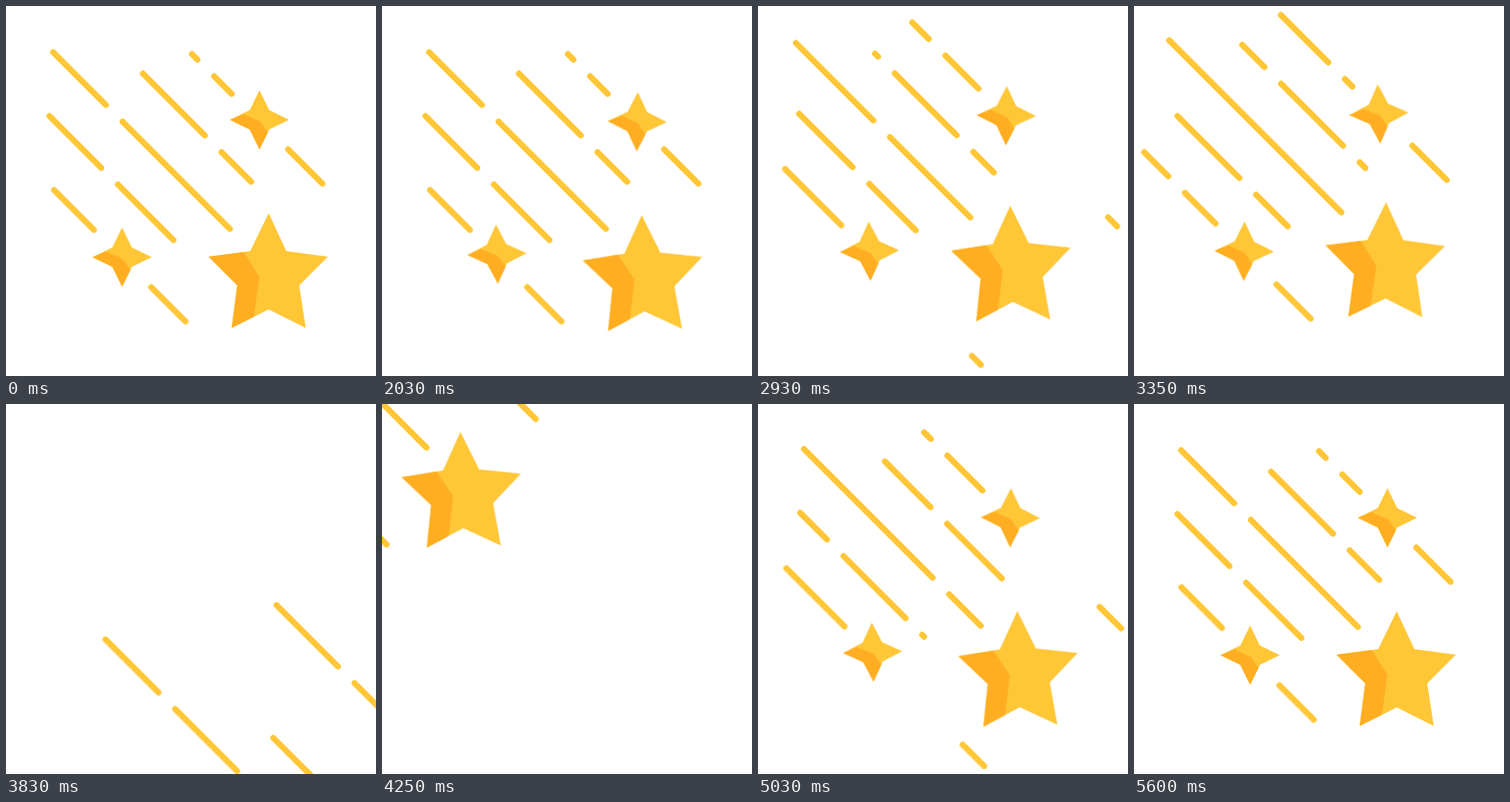
These frames come from a looping animation (400x400 px, 5630 ms). An HTML page without scripts:

```html
<!DOCTYPE html>
<html lang="en">
<head>
<meta charset="utf-8">
<title>Shooting stars</title>
<style>
html, body { margin: 0; width: 100%; height: 100%; overflow: hidden; background: #fff; }
svg { display: block; width: 100vw; height: 100vh; }

.light { fill: #ffc636; }
.dark { fill: #ffae22; }

/* Each group leans back, shoots off the lower right and returns from the upper left. */
.ride { animation: ride 5.63s linear infinite; }
.shake { transform-box: fill-box; transform-origin: center; animation: shake 5.63s linear infinite; }

/* Streaks are drawn from the head backwards; the matrix turns x into the diagonal. */
.streak {
  fill: none; stroke: #ffc636; stroke-width: 4.6; stroke-linecap: round;
  stroke-dasharray: 67 18;
  animation: 5.63s linear infinite;
}
.outer { animation-name: flow-outer, var(--length); }
.inner { animation-name: flow-inner, var(--length); }
.main { stroke-dasharray: 193 18; animation-name: flow-main, var(--length); }
.front { stroke-dasharray: 37 106; animation-name: flow-front; }

@keyframes ride {
  0%, 36.06% { translate: 0 0; }
  44.58% { translate: var(--a) var(--a); }
  59.5% { translate: var(--b) var(--b); animation-timing-function: cubic-bezier(.55, .055, .675, .19); }
  68.03% { translate: 400px 400px; }
  70.1% { translate: 650px 650px; }
  70.16% { translate: var(--from) var(--from); animation-timing-function: cubic-bezier(.25, .46, .45, .94); }
  89.88%, 100% { translate: 0 0; }
}
@keyframes shake {
  0%, 35.9%, 99.4%, 100% { transform: none; }
  36.06%, 46.8%, 53.2%, 57.4%, 63.7%, 77.7%, 84%, 90.3%, 96.6% { transform: var(--p); }
  40.3%, 44.58%, 51%, 61.6%, 81.88%, 88.2%, 94.5% { transform: var(--q); }
  38.2%, 42.4%, 49%, 55.3%, 59.5%, 79.8%, 86%, 92.4%, 98.2% { transform: var(--r); }
}

@keyframes flow-outer {
  0%, 36.06% { stroke-dashoffset: var(--o); animation-timing-function: ease-in; }
  44.58% { stroke-dashoffset: calc(var(--o) - 129px); }
  59.5% { stroke-dashoffset: calc(var(--o) - 244px); }
  68.03% { stroke-dashoffset: calc(var(--o) - 270px); }
  81.88% { stroke-dashoffset: calc(var(--o) - 350px); animation-timing-function: ease-out; }
  100% { stroke-dashoffset: calc(var(--o) - 510px); }
}
@keyframes flow-inner {
  0%, 36.06% { stroke-dashoffset: var(--o); animation-timing-function: ease-in; }
  44.58% { stroke-dashoffset: calc(var(--o) - 91px); }
  59.5% { stroke-dashoffset: calc(var(--o) - 229px); }
  68.03% { stroke-dashoffset: calc(var(--o) - 258px); }
  81.88% { stroke-dashoffset: calc(var(--o) - 370px); animation-timing-function: ease-out; }
  100% { stroke-dashoffset: calc(var(--o) - 510px); }
}
@keyframes flow-main {
  0%, 36.06% { stroke-dashoffset: 77px; animation-timing-function: ease-in; }
  44.58% { stroke-dashoffset: 1px; }
  59.5% { stroke-dashoffset: -210px; }
  81.88% { stroke-dashoffset: -358px; animation-timing-function: ease-out; }
  100% { stroke-dashoffset: -556px; }
}
@keyframes flow-front {
  0%, 36.06% { stroke-dashoffset: -52px; animation-timing-function: ease-in; }
  44.58% { stroke-dashoffset: -183px; }
  59.5% { stroke-dashoffset: -334px; }
  81.88% { stroke-dashoffset: -465px; animation-timing-function: ease-out; }
  100% { stroke-dashoffset: -624px; }
}

@keyframes length-a {
  0%, 36.06%, 100% { d: path("M0 0H-43"); }
  44.58% { d: path("M0 0H-66"); }
  59.5% { d: path("M0 0H-77"); }
  68.03%, 70.1% { d: path("M0 0H-200"); }
  70.16%, 81.88% { d: path("M0 0H-77"); }
}
@keyframes length-b {
  0%, 36.06%, 100% { d: path("M0 0H-117"); }
  44.58% { d: path("M0 0H-124"); }
  59.5% { d: path("M0 0H-133"); animation-timing-function: cubic-bezier(.55, .055, .675, .19); }
  68.03% { d: path("M0 0H-375"); }
  70.1% { d: path("M0 0H-300"); }
  70.16%, 81.88% { d: path("M0 0H-133"); }
}
@keyframes length-c {
  0%, 44.58%, 70.16%, 100% { d: path("M0 0H-191"); }
  59.5% { d: path("M0 0H-186"); }
}
@keyframes length-d {
  0%, 36.06%, 100% { d: path("M0 0H-134"); }
  44.58% { d: path("M0 0H-132"); }
  59.5% { d: path("M0 0H-120"); animation-timing-function: cubic-bezier(.55, .055, .675, .19); }
  68.03%, 70.1% { d: path("M0 0H-294"); }
  70.16%, 81.88% { d: path("M0 0H-134"); }
}
@keyframes length-e {
  0%, 36.06%, 100% { d: path("M0 0H-43"); }
  44.58% { d: path("M0 0H-64"); }
  59.5% { d: path("M0 0H-77"); animation-timing-function: cubic-bezier(.55, .055, .675, .19); }
  68.03% { d: path("M0 0H-390"); }
  70.1% { d: path("M0 0H-300"); }
  70.16%, 81.88% { d: path("M0 0H-77"); }
}
</style>
</head>
<body>
<svg viewBox="0 0 400 400">
  <defs>
    <g id="spark">
      <path class="light" d="M0-32 10.5-10.5 32 0 10.5 10.5 0 32-10.5 10.5-32 0-10.5-10.5Z"/>
      <path class="dark" d="M-32 0-17-6 1 2 9 14 0 32-10.5 10.5Z"/>
    </g>
  </defs>

  <g class="ride" style="--a:-5px;--b:-15px;--from:-450px">
    <path class="streak inner" style="--o:35px;--length:length-b" transform="matrix(1 1 -1 1 265 190)" d="M0 0H-117"/>
  </g>
  <g class="ride" style="--a:-6px;--b:-15px;--from:-440px">
    <path class="streak inner" style="--o:7px;--length:length-d" transform="matrix(1 1 -1 1 181 253)" d="M0 0H-134"/>
  </g>
  <g class="ride" style="--a:-7px;--b:-18px;--from:-378px">
    <path class="streak main" style="--length:length-c" transform="matrix(1 1 -1 1 242 241)" d="M0 0H-191"/>
  </g>

  <g class="ride" style="--a:-3.5px;--b:-8px;--from:-444px">
    <path class="streak outer" style="--o:48px;--length:length-a" transform="matrix(1 1 -1 1 244 95)" d="M0 0H-43"/>
    <path class="streak front" transform="matrix(1 1 -1 1 394 244)" d="M0 0H-104"/>
    <g class="shake" style="--p:translate(2px,2px) rotate(1deg);--q:translate(-1.5px,.5px) rotate(.8deg);--r:translate(-1.3px,1.5px) rotate(-2.5deg)">
      <use href="#spark" x="274" y="123"/>
    </g>
  </g>

  <g class="ride" style="--a:-3px;--b:-7px;--from:-470px">
    <path class="streak outer" style="--o:23px;--length:length-e" transform="matrix(1 1 -1 1 95 242)" d="M0 0H-43"/>
    <path class="streak front" transform="matrix(1 1 -1 1 246 393)" d="M0 0H-104"/>
    <g class="shake" style="--p:translate(-1.3px,-3.3px) rotate(-1.8deg);--q:translate(1.5px,.2px) rotate(-1.7deg);--r:translate(.5px,.5px) rotate(.9deg)">
      <use href="#spark" x="125.5" y="271.5"/>
    </g>
  </g>

  <g class="ride" style="--a:-6px;--b:-12px;--from:-382px">
    <g class="shake" style="--p:translate(-1.4px,2.2px) rotate(-1.7deg);--q:translate(0,-.3px) rotate(-1.3deg);--r:rotate(.4deg)">
      <path class="light" d="M284 224 303 265 348 271 317 302 324 348 284 328 244 348 250 302 219 271 264 265Z"/>
      <path class="dark" d="M219 271 257 266 274 293 268 336 244 348 250 302Z"/>
    </g>
  </g>
</svg>
</body>
</html>
```
